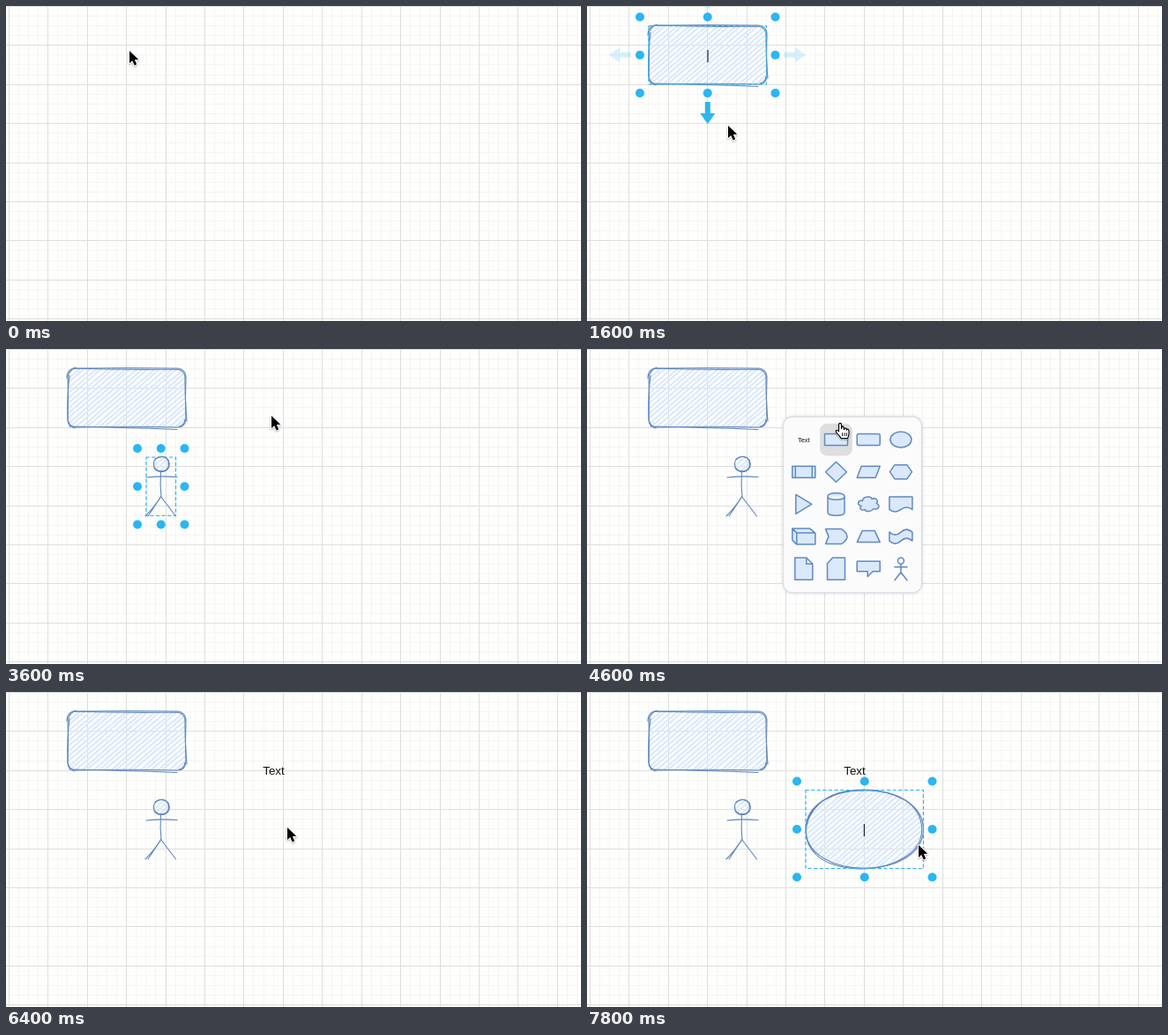
Write an HTML page with a canvas that moves like this. It is 652 by 358 pixels and loops after 8000 ms.

```html
<!DOCTYPE html>
<html lang="en">
<head>
<meta charset="utf-8">
<title>Sketch editor</title>
<style>
  html, body { margin: 0; width: 100%; height: 100%; overflow: hidden; background: #fefefd; }
  canvas { display: block; }
</style>
</head>
<body>
<canvas id="stage" width="652" height="358"></canvas>
<script>
const ctx = document.getElementById('stage').getContext('2d');
const LOOP = 8000, STEP = 200;
const INK = '#5d86bf', FILL = '#dae8fc', ACCENT = '#29b6f2';
const FONT = '"Liberation Sans", Arial, sans-serif';
const CELL = 36.7;

// Pointer stops: time, x, y
const stops = [
  [0, 140, 51], [600, 140, 51], [1000, 162, 82], [1200, 162, 82],
  [1600, 160, 136], [1800, 178, 155], [2200, 178, 155], [2800, 239, 334],
  [3000, 239, 334], [3600, 301, 76], [4400, 301, 76], [5000, 247, 109],
  [6000, 247, 109], [6400, 319, 154], [6600, 319, 154], [7000, 375, 170],
  [7200, 375, 170], [7600, 376, 174], [8000, 376, 174]
];

// Shape picker: opened, closed, left, top
const pickers = [
  [400, 1200, 61.5, 51], [2200, 3000, 100.5, 156],
  [4400, 5200, 222.5, 77], [6600, 7200, 240.5, 154]
];

const box = (w, h) => `M${-w / 2} ${-h / 2}h${w}v${h}h${-w}z`;
const oval = (rx, ry) => `M${-rx} 0a${rx} ${ry} 0 1 0 ${2 * rx} 0a${rx} ${ry} 0 1 0 ${-2 * rx} 0z`;

// Picker icons, row by row; the first cell holds text
const icons = [
  '',
  box(26, 13),
  'M-11.5-6.5H11.5Q13-6.5 13-5V5Q13 6.5 11.5 6.5H-11.5Q-13 6.5-13 5V-5Q-13-6.5-11.5-6.5z',
  oval(12, 9),
  box(26, 13) + 'M-9.5-6.5V6.5M9.5-6.5V6.5',
  'M0-11.5L12 0L0 11.5L-12 0z',
  'M-8-6.5H13L8 6.5H-13z',
  'M-7-8H7L12.5 0L7 8H-7L-12.5 0z',
  'M-9-11L9 0L-9 11z',
  'M-9.5-9C-9.5-14 9.5-14 9.5-9V9C9.5 14-9.5 14-9.5 9zM-9.5-9C-9.5-4 9.5-4 9.5-9',
  'M-7-4C-5-10 3-9 4-6C9-8 12-3 9-1C15 2 10 7 6 5C3 9-3 9-4 6C-9 8-11 4-8 2C-14 1-12-5-7-4z',
  'M-13-8.5H13V6Q6.5 1 0 6T-13 6z',
  'M-13-9H7L13-4V9H-8L-13 4zM-8 9V-4H13M-13-9L-8-4',
  'M-12-8.5H6Q12-5 12.5 0Q12 5 6 8.5H-12L-8.5 0z',
  'M-7-6.5H7L13 6.5H-13z',
  'M-13-5Q-6.5 1 0-5T13-5V5Q6.5-1 0 5T-13 5z',
  'M-10-12.5H3L10-5.5V12.5H-10zM3-12.5V-5.5H10',
  'M-4-12.5H10V12.5H-10V-6z',
  'M-13-8.5H13V3H5L-1 9V3H-13z',
  'M-3.5-9a3.5 3.5 0 1 0 7 0a3.5 3.5 0 1 0-7 0zM0-5.5V4M-7-2H7M0 4L-7 13M0 4L7 13'
].map(d => new Path2D(d));

const boxOutline = new Path2D('M79 22Q140 21 195 22Q203 23 204 31Q203 55 204 80Q203 89 195 89Q135 87.5 79 89Q71 88 70 80Q71 55 70 31Q72 24 79 21z');
const boxStrays = new Path2D('M69 33Q69 24 76 22Q135 24 194 23Q204 25 203 34Q203 60 205 82M203 80Q202 87 196 88M72 88Q130 89 194 91.5M78 90Q70 88 70 80Q69 54 72 30');
const actorHead = new Path2D('M167.5 131C167 120 185 119 184.5 131C185 142 167 141 167.5 131z');
const actorLimbs = new Path2D('M169 125Q178 119 184 126Q188 135 180 139Q171 141 168 135M175.5 139Q174.5 154 176 168M159 146Q176 144 194 145.5M176 167Q168 180 158 190M175 169L161 190M175.5 167.5L192.5 190');
const ellipseOutline = new Path2D('M248 156C248 97 381 97 381.5 156C381 215 248 215 248 156z');
const ellipseStrays = new Path2D('M249 150C258 106 330 103 361 123C384 139 387 169 363 186C329 209 276 203 259 184C245 170 245 150 258 133C275 112 300 111 314 112');

const arrowCursor = new Path2D('M0 0V14L3.2 11L5.7 16.4L8.2 15.3L5.8 10.1L10.2 9.8z');
const handCursor = new Path2D('M-1.5 9V1.5C-1.5-.7 1.5-.7 1.5 1.5V6C2-.2 4.6 5 4.5 7C5 4.6 7.4 5 7.4 7.4C8 5.8 10 6.4 10 8.5V12Q10 14 8.5 17H1Q-1-12 -1 14Q-5 10-4.8 8.5Q-4 6.8-1.5 9z'.replace('Q-1-12 -1 14', 'Q0 15-1 14'));
const handLines = new Path2D('M2.5 11V14M5 11V14M7.3 11V14');

function stroke(path, color = INK, width = 1.1) {
  ctx.strokeStyle = color;
  ctx.lineWidth = width;
  ctx.stroke(path);
}

function at(x, y, draw) {
  ctx.save();
  ctx.translate(x, y);
  draw();
  ctx.restore();
}

function label(text, x, y, size) {
  ctx.fillStyle = '#111';
  ctx.font = `${size}px ${FONT}`;
  ctx.textAlign = 'center';
  ctx.fillText(text, x, y);
}

function drawGrid() {
  ctx.fillStyle = '#fefefd';
  ctx.fillRect(0, 0, 652, 358);
  const pitch = 44.43 / 4;
  for (const major of [false, true]) {
    ctx.fillStyle = major ? '#dededd' : '#f5f5f3';
    for (let i = 0; i < 60; i++) {
      if ((i % 4 === 0) !== major) continue;
      ctx.fillRect(Math.floor(3.3 + i * pitch), 0, 1, 358);
      ctx.fillRect(0, Math.floor(0.3 + i * pitch), 652, 1);
    }
  }
}

function hatch(outline, x, y, w, h) {
  const lines = new Path2D(), run = h * 1.15;
  for (let sx = x - run, i = 0; sx < x + w; sx += 6.6, i++) {
    const wobble = Math.sin(i * 2.4);
    lines.moveTo(sx + wobble, y + h);
    lines.lineTo(sx + run - wobble, y);
  }
  ctx.save();
  ctx.clip(outline);
  stroke(lines, FILL, 2);
  ctx.restore();
}

function sketch(outline, strays, ...bounds) {
  hatch(outline, ...bounds);
  stroke(outline);
  stroke(strays);
}

function dashedBox(x, y, w, h) {
  ctx.setLineDash([3.3, 3.3]);
  ctx.strokeStyle = ACCENT;
  ctx.lineWidth = 1.2;
  ctx.strokeRect(x, y, w, h);
  ctx.setLineDash([]);
}

function select(x, y, w, h) {
  dashedBox(x, y, w, h);
  ctx.fillStyle = ACCENT;
  for (let i = 0; i < 9; i++) {
    if (i === 4) continue;
    ctx.beginPath();
    ctx.arc(x - 10 + (i % 3) * (w / 2 + 10), y - 10 + Math.floor(i / 3) * (h / 2 + 10), 5, 0, 7);
    ctx.fill();
  }
}

function caret(x, y) {
  ctx.fillStyle = '#222';
  ctx.fillRect(x, y, 1.2, 14);
}

function connectArrow(x, y, angle, alpha) {
  at(x, y, () => {
    ctx.rotate(angle);
    ctx.globalAlpha = alpha;
    ctx.fillStyle = ACCENT;
    ctx.fill(new Path2D('M0-3H13V-8.5L25 0L13 8.5V3H0z'));
  });
}

function cellAt(x, y, left, top) {
  const col = Math.floor((x - left - 5.3) / CELL), row = Math.floor((y - top - 5) / CELL);
  return col >= 0 && col < 4 && row >= 0 && row < 5 ? row * 4 + col : -1;
}

function drawPicker(left, top, hovered) {
  ctx.save();
  ctx.shadowColor = 'rgba(60,60,90,.22)';
  ctx.shadowBlur = 4;
  ctx.fillStyle = '#fbfbfb';
  ctx.beginPath();
  ctx.roundRect(left, top, 157, 200, 10);
  ctx.fill();
  ctx.restore();
  ctx.strokeStyle = '#dedee4';
  ctx.lineWidth = 1.3;
  ctx.stroke();
  icons.forEach((icon, i) => {
    at(left + 23.3 + (i % 4) * CELL, top + 26 + Math.floor(i / 4) * CELL, () => {
      if (i === hovered) {
        ctx.fillStyle = '#dedede';
        ctx.beginPath();
        ctx.roundRect(-18.3, -18.3, CELL, CELL, 8);
        ctx.fill();
      }
      if (i === 0) return label('Text', 0, 2.6, 7.5);
      ctx.fillStyle = FILL;
      if (i < 19) ctx.fill(icon);
      stroke(icon, '#5f8ac4', 1.5);
    });
  });
}

function drawPointer(x, y, hand) {
  at(x, y, () => {
    ctx.lineJoin = 'round';
    ctx.save();
    ctx.shadowColor = 'rgba(0,0,0,.3)';
    ctx.shadowBlur = 2;
    ctx.shadowOffsetY = 1;
    stroke(hand ? handCursor : arrowCursor, '#fff', 2);
    ctx.restore();
    ctx.fillStyle = hand ? '#fff' : '#000';
    ctx.fill(hand ? handCursor : arrowCursor);
    if (hand) {
      stroke(handCursor, '#000', 1.2);
      stroke(handLines, '#000', 0.9);
    }
  });
}

function pointerAt(t) {
  const i = stops.findIndex(s => s[0] > t);
  const [t0, x0, y0] = stops[i - 1], [t1, x1, y1] = stops[i];
  const p = (t - t0) / (t1 - t0), ease = p * p * (3 - 2 * p);
  return [x0 + (x1 - x0) * ease, y0 + (y1 - y0) * ease];
}

function drawScene(t) {
  const during = (from, to) => t >= from && t < to;
  drawGrid();
  ctx.lineCap = ctx.lineJoin = 'round';

  if (t >= 1200) sketch(boxOutline, boxStrays, 70, 22, 134, 67);
  if (during(1200, 2000)) {
    select(70, 22.5, 133.5, 66.5);
    connectArrow(223, 55.5, 0, 0.18);
    connectArrow(136.8, 109, Math.PI / 2, t >= 1400 ? 1 : 0.18);
    connectArrow(50, 55.5, Math.PI, 0.18);
    connectArrow(136.8, 2, -Math.PI / 2, 0.18);
    caret(136.4, 50);
  }

  if (t >= 3000) {
    sketch(actorHead, actorLimbs, 167, 122, 18, 18);
    if (t < 4200) select(159, 123, 33.5, 66.5);
  }

  if (t >= 5200) {
    if (t < 6000) {
      dashedBox(281.5, 78.5, 44.5, 22);
      ctx.fillStyle = '#b3d4f7';
      ctx.fillRect(291, 82, 24.5, 15);
    }
    label('Text', 303.5, 93.5, 13.4);
  }

  if (t >= 7200) {
    sketch(ellipseOutline, ellipseStrays, 248, 111, 134, 90);
    select(248, 111.5, 133.5, 89);
    caret(313.8, 150);
  }

  const [x, y] = pointerAt(t);
  const picker = pickers.find(([from, to]) => during(from, to));
  let hovered = -1;
  if (picker) {
    const [, , left, top] = picker;
    hovered = cellAt(x, y, left, top);
    drawPicker(left, top, hovered);
  }
  drawPointer(x, y, hovered >= 0);
}

const start = performance.now();
function frame() {
  const t = (performance.now() - start) % LOOP;
  drawScene(Math.floor(t / STEP) * STEP);
  requestAnimationFrame(frame);
}
frame();
</script>
</body>
</html>
```
